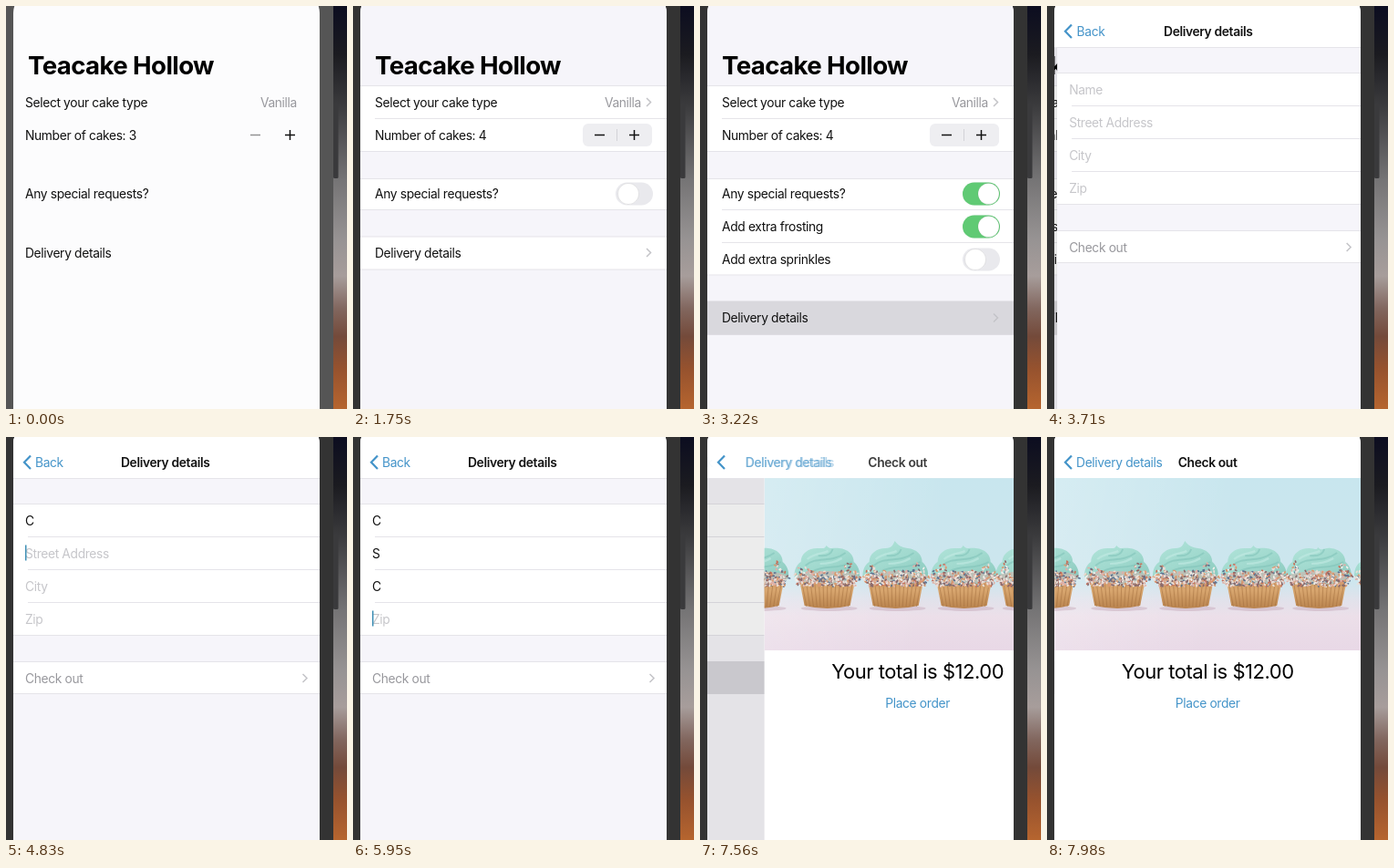
An HTML page that plays this animation: 374x442 px, repeating every 8 s.

```html
<!DOCTYPE html>
<html lang="en">
<head>
<meta charset="utf-8">
<title>Cake order form</title>
<style>
  html, body { margin: 0; width: 100%; height: 100%; overflow: hidden; background: #333; }
  svg { display: block; width: 374px; height: 442px; }
  text { font: 13.8px Inter, Roboto, sans-serif; letter-spacing: -.35px; fill: #111; white-space: pre; }
  .large { font-size: 27.6px; font-weight: 700; letter-spacing: -.6px; fill: #000; }
  .total { font-size: 22px; letter-spacing: -.48px; fill: #000; }
  .bold { font-weight: 600; }
  .blue { fill: #4494c9; }
  .gray { fill: #98989d; }
  .hint { fill: #c6c6ca; }
  .line { fill: #e5e4e9; }
  .chevron { fill: none; stroke: #c4c4c8; stroke-width: 1.5; }
</style>
</head>
<body>
<svg id="stage" viewBox="0 0 374 442"></svg>
<script>
const LOOP = 8000, STEP = 70, WIDTH = 336;
const PUSH_DETAILS = 3290, PUSH_CHECKOUT = 7367;
const fields = [
  { hint: 'Name', value: 'C', focus: 4200, typed: 4620 },
  { hint: 'Street Address', value: 'S', focus: 4830, typed: 5180 },
  { hint: 'City', value: 'C', focus: 5390, typed: 5740 },
  { hint: 'Zip', value: 'Z', focus: 5880, typed: 6370 }
];

// Markup helpers
const rect = (x, y, w, h, fill, more = '') =>
  `<rect x="${x}" y="${y}" width="${w}" height="${h}" fill="${fill}" ${more}/>`;
const text = (x, y, s, cls = '', more = '') =>
  `<text x="${x}" y="${y}" class="${cls}" ${more}>${s}</text>`;
const line = (x, y) => `<rect class="line" x="${x}" y="${y}" width="${344 - x}" height="1"/>`;
const section = (y, h) => rect(8, y, WIDTH, h, '#fff') + line(8, y - .5) + line(8, y + h - .5);
const chevron = (x, y) => `<path class="chevron" d="M${x} ${y - 4.5}l4.5 4.5l-4.5 4.5"/>`;
const toggle = (id, y) => `<g id="${id}">
  ${rect(288, y - 12.5, 41, 25, '#e9e9ed', 'rx="12.5"')}
  ${rect(288, y - 12.5, 41, 25, '#60ca74', 'rx="12.5" class="on"')}
  <circle class="knob" cx="301" cy="${y}" r="11.5" fill="#fff" stroke="#000" stroke-opacity=".08"/></g>`;
const gradient = (id, stops, direction = 'x2="0" y2="1"') => `<linearGradient id="${id}" ${direction}>` +
  stops.map(([at, c]) => `<stop offset="${at}" stop-color="${c}"/>`).join('') + '</linearGradient>';

let seed = 7;
const random = () => (seed = seed * 16807 % 2147483647) / 2147483647;

function sprinkles() {
  const colors = ['#c9705a', '#5b7391', '#f3efeb', '#dfb0a8', '#d99a70', '#8a6a6c', '#e9ddd6'];
  return colors.map(color => {
    let d = '';
    for (let i = 0; i < 46; i++) {
      const y = 136 + 27 * Math.sqrt(random());
      const half = 37 - Math.abs(y - 153) * .6;
      const x = (random() * 2 - 1) * half;
      // The front of the frosting stays mostly bare above the band.
      if (y < 146 && Math.abs(x) < 19) continue;
      const a = random() * Math.PI;
      d += `M${x.toFixed(1)} ${y.toFixed(1)}l${(1.4 * Math.cos(a)).toFixed(1)} ${(1.4 * Math.sin(a)).toFixed(1)}`;
    }
    return `<path d="${d}" stroke="${color}" stroke-width="1.7" stroke-linecap="round"/>`;
  }).join('');
}

function cupcake(x, top) {
  let pleats = '';
  for (let i = -6; i <= 6; i++) pleats += `M${i * 4.7} 157L${i * 3.8} 186`;
  return `<g transform="translate(${x})">
    <ellipse cx="2" cy="188" rx="31" ry="3" fill="#b793a5" opacity=".35"/>
    <path d="M-31 155H31L25 185Q0 191 -25 185Z" fill="url(#wrapper)"/>
    <path d="${pleats}" stroke="#a06c3c" opacity=".5"/>
    <path d="M-36 154C-37 146 -33 139 -29 137C-29 128 -21 122 -11 122C-4 122 -3 ${top + 4} -1 ${top}
      C3 ${top + 5} 6 121 13 122C23 123 29 129 29 137C33 140 37 147 35 155C22 164 -24 164 -36 154Z" fill="url(#mint)"/>
    <path d="M-24 141C-12 130 4 139 20 127M-15 147C-2 140 12 146 27 137M-10 130Q3 132 6 123"
      fill="none" stroke="#7dbfb6" stroke-width="2" opacity=".5"/>
    <path d="M-22 134C-14 127 -4 128 1 125M-8 139Q6 139 16 133"
      fill="none" stroke="#c4ece5" stroke-width="2.2" opacity=".6"/>
    <ellipse cy="154" rx="35" ry="7" fill="#cbb9b1" opacity=".7"/>
    ${sprinkles()}</g>`;
}

const form = `<g id="form">
  ${rect(8, 0, WIDTH, 442, '#fcfcfd')}
  <g class="panel">
    ${rect(8, 0, WIDTH, 442, '#f6f5fa')}${section(87.5, 72)}${line(24, 123)}
    ${rect(8, 189.5, WIDTH, 34, '#fff', 'id="requests"')}
    ${line(8, 189)}
  </g>
  ${text(24, 75, 'Teacake Hollow', 'large')}
  <g class="left">
    ${text(24, 110.5, 'Select your cake type')}
    <text id="count" x="24" y="146.5"></text>
    ${text(24, 211, 'Any special requests?')}
  </g>
  <g class="right">
    ${text(316, 110.5, 'Vanilla', 'gray', 'text-anchor="end"')}
    <g class="panel">${chevron(322, 105.5)}${rect(252, 129, 76, 25, '#eeeef1', 'rx="6"')}
      ${rect(289, 135, 1, 13, '#d2d2d6')}</g>
    <path id="minus" d="M265 141.5h11" stroke="#111" stroke-width="1.5"/>
    <path d="M303 141.5h11M308.5 136v11" stroke="#111" stroke-width="1.5"/>
  </g>
  <g class="panel">${toggle('special', 206)}</g>
  <g id="extras" clip-path="url(#extrasClip)">
    ${line(24, 223)}${line(24, 259)}
    ${text(24, 247, 'Add extra frosting')}${text(24, 283, 'Add extra sprinkles')}
    ${toggle('frosting', 242)}${toggle('sprinkles', 278)}
  </g>
  <g id="delivery">
    <g class="panel">${line(8, 223)}${section(253, 36)}
      ${rect(8, 252, WIDTH, 37, '#d9d8dd', 'id="deliveryLit"')}</g>
    <g class="left">${text(24, 275.5, 'Delivery details')}</g>
    <g class="panel">${chevron(322, 270.5)}</g>
  </g></g>`;

const details = `<g id="details">
  ${rect(8, 0, WIDTH, 442, '#f6f5fa')}${section(73.5, 144)}
  ${[109, 145, 181].map(y => line(24, y)).join('')}${section(246.5, 35)}
  ${rect(8, 246, WIDTH, 36, '#d9d8dd', 'id="checkLit"')}
  ${fields.map((f, i) => `<text id="field${i}" x="21" y="${96.5 + 36 * i}"></text>`).join('')}
  ${rect(21, 0, 1.5, 17, '#3f8fb5', 'id="cursor"')}
  ${text(21, 269.5, 'Check out', '', 'id="checkLabel"')}${chevron(325.5, 264.5)}</g>`;

const checkout = `<g id="checkout">
  ${rect(8, 0, WIDTH, 442, '#fff')}
  <g clip-path="url(#photoClip)">
    ${rect(8, 45, WIDTH, 189, 'url(#photo)')}${rect(8, 45, WIDTH, 189, 'url(#glow)')}
    ${[[-1, 119], [77, 119], [152, 114], [227, 119], [298, 121], [373, 119]].map(c => cupcake(...c)).join('')}
  </g>
  ${text(176, 265, 'Your total is $12.00', 'total', 'text-anchor="middle"')}
  ${text(176, 296.5, 'Place order', 'blue', 'text-anchor="middle"')}</g>`;

const nav = `<g id="nav">
  ${rect(8, 0, WIDTH, 45, '#fff')}<g id="navLine">${line(8, 45)}</g>
  <path d="M27 20.5l-7 7.3l7 7.3" fill="none" stroke="#4494c9" stroke-width="2.2"/>
  ${text(32, 32.5, 'Back', 'blue', 'id="back"')}
  ${text(126, 32.5, 'Delivery details', 'bold', 'id="detailsTitle"')}
  ${text(32, 32.5, 'Delivery details', 'blue', 'id="detailsBack"')}
  ${text(176, 32.5, 'Check out', 'bold', 'id="checkTitle" text-anchor="middle"')}</g>`;

const stage = document.getElementById('stage');
stage.innerHTML = `<defs>
    ${gradient('wall', [[0, '#0c0d20'], [.12, '#1b1b20'], [.25, '#3c3c3e'], [.43, '#757475'],
      [.58, '#979393'], [.67, '#a79d9b'], [.75, '#82675f'], [.82, '#744a3a'], [.9, '#96522e'], [1, '#b6652f']])}
    ${gradient('photo', [[0, '#c8e6ee'], [.6, '#cde6ee'], [.7, '#e0e2eb'], [.8, '#ecdfe9'], [1, '#e8d8e6']])}
    ${gradient('glow', [[0, '#fff'], [.6, 'rgba(255,255,255,0)']], 'opacity=".3" x2="1" y2=".1"').replaceAll('"#fff"', '"rgba(255,255,255,.25)"')}
    ${gradient('wrapper', [[0, '#cf9d68'], [.4, '#d8a66f'], [1, '#b9834d']])}
    ${gradient('mint', [[0, '#b2e4da'], [.55, '#a0d9ce'], [1, '#8ccabf']], 'x2=".7" y2="1"')}
    <clipPath id="screen"><rect x="8" y="-18" width="336" height="500" rx="26"/></clipPath>
    <clipPath id="photoClip"><rect x="8" y="45" width="336" height="189"/></clipPath>
    <clipPath id="extrasClip"><rect id="extrasBox" x="8" y="190" width="336" height="34"/></clipPath>
  </defs>
  ${rect(359, 0, 15, 442, 'url(#wall)')}
  ${rect(0, 0, 359, 442, '#333', 'id="bezel"')}
  ${rect(359, 106, 5.5, 83, '#3a3a3c', 'rx="1.5"')}
  <g clip-path="url(#screen)">
    ${form}${rect(8, 0, WIDTH, 442, '#000', 'id="dimForm"')}
    ${details}${rect(8, 0, WIDTH, 442, '#000', 'id="dimDetails"')}
    ${checkout}${nav}
  </g>`;

const $ = id => document.getElementById(id);
const set = (el, name, value) => el.setAttribute(name, value);
const fade = (id, v) => set($(id), 'opacity', v);
const move = (el, x, y = 0) => set(el, 'transform', `translate(${x} ${y})`);
const all = (cls, fn) => stage.querySelectorAll(cls).forEach(fn);

const ramp = (t, from, to) => Math.min(1, Math.max(0, (t - from) / (to - from)));
const ease = p => p * p * (3 - 2 * p);
// Share of a page push still to travel, as a critically damped spring.
const remaining = t => {
  const s = 16 * Math.max(0, t) / 1000;
  return (1 + s) * Math.exp(-s);
};

function setToggle(id, p) {
  set($(id).querySelector('.on'), 'opacity', p);
  set($(id).querySelector('.knob'), 'cx', 302 + 14.5 * p);
}

function drawForm(t) {
  const shown = ramp(t, 490, 840), inset = 3 * (1 - ramp(t, 0, 210));
  const open = ease(ramp(t, 1820, 2310));
  const shade = Math.round(85 - 34 * shown);
  set($('bezel'), 'fill', `rgb(${shade},${shade},${shade})`);
  all('.panel', el => set(el, 'opacity', shown));
  all('.left', el => move(el, -inset));
  all('.right', el => move(el, inset));
  fade('minus', .45 + .55 * shown);
  $('count').textContent = 'Number of cakes: ' + (t < 140 ? 3 : 4);

  setToggle('special', ease(ramp(t, 1750, 2030)));
  setToggle('frosting', ease(ramp(t, 2590, 2870)));
  setToggle('sprinkles', 0);
  set($('requests'), 'height', 34 + 72 * open);
  set($('extrasBox'), 'height', 34 + 72 * open);
  fade('extras', open);
  move($('delivery'), 0, 71.5 * open);
  fade('deliveryLit', t >= 3220 ? 1 : 0);
}

function drawDetails(t) {
  fields.forEach((f, i) => {
    const el = $('field' + i), typed = t >= f.typed;
    el.textContent = typed ? f.value : f.hint;
    set(el, 'class', typed ? '' : 'hint');
  });
  const active = fields.filter(f => t >= f.focus).length - 1;
  fade('cursor', active < 0 ? 0 : 1);
  if (active >= 0) {
    set($('cursor'), 'x', t >= fields[active].typed ? 31.5 : 21);
    set($('cursor'), 'y', 82.5 + 36 * active);
  }
  set($('checkLabel'), 'class', t >= 6370 ? '' : 'gray');
  fade('checkLit', ramp(t, 6860, 7000));
}

function drawPush(t) {
  const a = remaining(t - PUSH_DETAILS), b = remaining(t - PUSH_CHECKOUT);
  move($('form'), -.3 * WIDTH * (1 - a));
  move($('details'), WIDTH * (a - .3 * (1 - b)));
  move($('checkout'), WIDTH * b);
  fade('dimForm', .09 * (1 - a));
  fade('dimDetails', .09 * (1 - b));

  fade('nav', 1 - a);
  fade('navLine', b);
  fade('back', b * b);
  move($('back'), 60 * a - 60 * (1 - b));
  move($('detailsTitle'), .65 * WIDTH * a - 94 * (1 - b));
  const sliding = b < 1;
  set($('detailsTitle'), 'class', sliding && b < .6 ? 'bold blue' : 'bold');
  fade('detailsTitle', sliding ? Math.min(1, 2 * b) : 1);
  move($('detailsBack'), 96 * b);
  fade('detailsBack', (1 - b) ** 2);
  move($('checkTitle'), .65 * WIDTH * b);
  fade('checkTitle', 1 - b);
}

function render(now) {
  const t = Math.floor(now % LOOP / STEP) * STEP;
  drawForm(t);
  drawDetails(t);
  drawPush(t);
}

const start = performance.now();
function tick() {
  render(performance.now() - start);
  requestAnimationFrame(tick);
}
tick();
</script>
</body>
</html>
```
